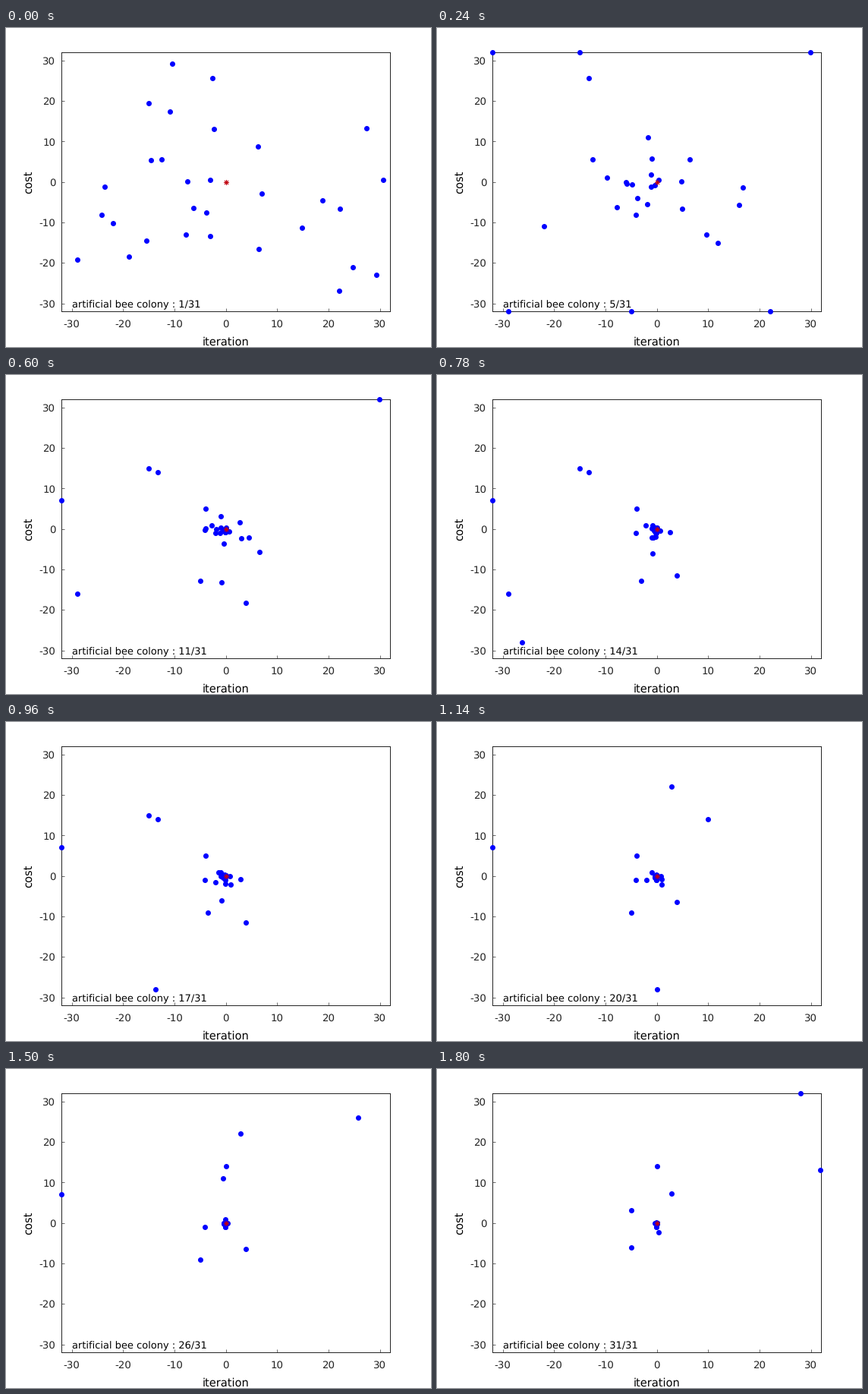
A matplotlib script that plays this animation: 560x420 px, repeating every 1.86 s.

```python
from itertools import chain

import numpy as np
import matplotlib.pyplot as plt
from matplotlib.animation import FuncAnimation

W, H, DPI = 560, 420, 100
PX = 72 / DPI
LEFT, RIGHT, TOP, BOTTOM = 73.2, 506.2, 32.2, 373.2
STEPS, WORKERS, LIMIT = 31, 26, 32
INK = "#262626"
TICKS = range(-30, 31, 10)

plt.rcParams.update({
    "font.family": "DejaVu Sans",
    "axes.unicode_minus": False,
    "text.hinting": "none",
})
rng = np.random.default_rng(8)

# Hops of the scouts that roam far from the swarm: step, x, y.
SCOUTS = [
    [(0, 30.6, 0.6), (3, 29.9, 32), (13, -26.3, -28), (15, -13.7, -28),
     (19, 0, -28), (24, 25.7, 26.1), (28, 28, 32)],
    [(0, -15, 19.4), (2, -15, 32), (7, -15, 15), (18, 2.9, 22.1),
     (28, 2.9, 7.2)],
    [(0, -2.6, 25.7), (2, -13.2, 25.7), (8, -13.2, 14.1), (18, 10, 14),
     (24, 0.1, 14)],
    [(0, -12.5, 5.5), (7, -3.9, 5.1), (20, 25, 11.1), (24, -0.5, 11.1),
     (28, 31.8, 13)],
]


def ackley(spot):
    radius = np.sqrt(np.mean(spot ** 2))
    ripple = np.exp(np.mean(np.cos(2 * np.pi * spot)))
    return 20 - 20 * np.exp(-0.2 * radius) + np.e - ripple


def forage(swarm):
    """One colony cycle: every worker tries a move, then the onlookers do."""
    fitness = np.array([1 / (1 + ackley(spot)) for spot in swarm])
    onlookers = rng.choice(WORKERS, WORKERS, p=fitness / fitness.sum())
    for bee in chain(range(WORKERS), onlookers):
        partner = (bee + rng.integers(1, WORKERS)) % WORKERS
        axis = rng.integers(2)
        trial = swarm[bee].copy()
        trial[axis] += rng.uniform(-1, 1) * (trial[axis] - swarm[partner, axis])
        trial = trial.clip(-LIMIT, LIMIT)
        if ackley(trial) < ackley(swarm[bee]):
            swarm[bee] = trial


def build_path():
    path = np.zeros((STEPS, WORKERS + len(SCOUTS), 2))
    swarm = rng.uniform(-30, 30, (WORKERS, 2))
    for step in range(STEPS):
        path[step, :WORKERS] = swarm
        forage(swarm)
    for bee, hops in enumerate(SCOUTS, WORKERS):
        for step, x, y in hops:
            path[step:, bee] = x, y
    return path


def label(x, y, text, size=13.33, **kw):
    kw = {"color": INK, "ha": "center", "va": "baseline", **kw}
    return fig.text(x / W, 1 - y / H, text, fontsize=size * PX, **kw)


path = build_path()

fig = plt.figure(figsize=(W / DPI, H / DPI), dpi=DPI, facecolor="white")
ax = fig.add_axes([LEFT / W, 1 - BOTTOM / H, (RIGHT - LEFT) / W, (BOTTOM - TOP) / H])
ax.set(xlim=(-LIMIT, LIMIT), ylim=(-LIMIT, LIMIT), xticks=TICKS, yticks=TICKS)
ax.tick_params(direction="in", length=4 * PX, width=0.67 * PX, color=INK,
               labelbottom=False, labelleft=False)
for spine in ax.spines.values():
    spine.set(linewidth=PX, color=INK)

for value in TICKS:
    part = (value + LIMIT) / (2 * LIMIT)
    label(LEFT + part * (RIGHT - LEFT), 394, str(value))
    label(65.5, BOTTOM - part * (BOTTOM - TOP) + 5, str(value), ha="right")
label(290, 418, "iteration", 14.67, color="black")
label(33.5, 202.5, "cost", 14.67, color="black", rotation=90,
      rotation_mode="anchor")
counter = label(87, 368, "", 13, color="black", ha="left")

bees, = ax.plot([], [], "o", color="blue", markersize=7 * PX,
                markeredgewidth=0, clip_on=False, zorder=5)
best, = ax.plot([0], [0], marker=(8, 2, 0), color="#c00010", markersize=7 * PX,
                markeredgewidth=0.9 * PX, clip_on=False, zorder=6)


def update(step):
    bees.set_data(*path[step].T)
    counter.set_text(f"artificial bee colony : {step + 1}/{STEPS}")
    return bees, counter


anim = FuncAnimation(fig, update, frames=STEPS, interval=60, repeat=True,
                     repeat_delay=0)
plt.show()
```
